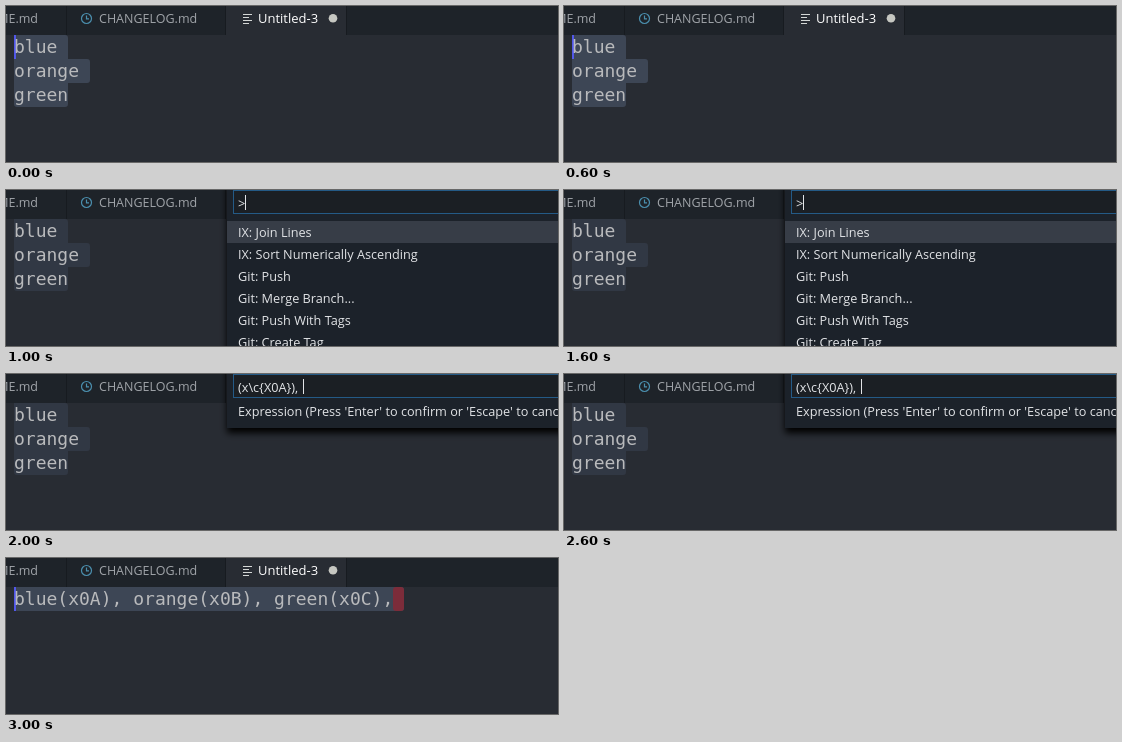
Recreate the animation shown at these times as an HTML page. Size 552x156 px, loop 4 s.

```html
<!DOCTYPE html>
<html lang="en">
<head>
<meta charset="utf-8">
<style>
  html, body { margin: 0; width: 100%; height: 100%; overflow: hidden; background: #282c33; }
  svg { display: block; }
  text { white-space: pre; }
  .ui { font: 12.7px "Open Sans", "Noto Sans", sans-serif; fill: #e2e4e7; }
  .tab { font-size: 12.5px; fill: #a0a4a9; }
  .code { font: 18px "DejaVu Sans Mono", monospace; fill: #b9babc; }
  .sel { fill: #3d4655; }
  .idle .sel { fill: #313844; }
  .caret { fill: #5258ea; }
  .idle .caret { display: none; }
</style>
</head>
<body>
<svg width="552" height="156" viewBox="0 0 552 156">
  <defs>
    <filter id="shadow" x="-10%" y="-20%" width="120%" height="160%">
      <feDropShadow dx="0" dy="5" stdDeviation="3.5" flood-color="#000"/>
    </filter>
  </defs>
  <rect width="552" height="156" fill="#282c33"/>

  <!-- Tab bar -->
  <rect width="552" height="29" fill="#1e2329"/>
  <path d="M60.5 0V29M219.5 0V29M340.5 0V29" stroke="#171b20"/>
  <rect x="220" width="120" height="29" fill="#282c33"/>
  <g class="ui">
    <text class="tab" x="32" y="17" text-anchor="end">README.md</text>
    <text class="tab" x="93" y="17">CHANGELOG.md</text>
    <text x="252" y="17" style="font-size:13px;fill:#fff">Untitled-3</text>
  </g>
  <g fill="none" stroke="#4b8fae" stroke-width="1.2">
    <circle cx="80.5" cy="12.5" r="5"/>
    <path d="M80.5 9.5V12.8H83"/>
  </g>
  <path d="M237 8.5h9M237 11.5h6M237 14.5h9M237 17.5h6" stroke="#d4d7d6"/>
  <circle cx="327" cy="12.2" r="4.3" fill="#c6c7c1"/>

  <!-- Editor -->
  <g id="list">
    <path class="sel" d="M8 29H59q3 0 3 3V53H81q3 0 3 3V74q0 3 -3 3H62V98q0 3 -3 3H11q-3 0 -3 -3Z"/>
    <rect class="caret" x="8" y="29" width="2" height="24"/>
    <g class="code">
      <text x="8" y="47">blue</text>
      <text x="8" y="71">orange</text>
      <text x="8" y="95">green</text>
    </g>
  </g>
  <g id="joined">
    <rect class="sel" x="8" y="29" width="390" height="24" rx="3"/>
    <rect x="387" y="29" width="11" height="24" rx="3" fill="#7c2c3a"/>
    <rect class="caret" x="8" y="29" width="2" height="24"/>
    <text class="code" x="8" y="47">blue(x0A), orange(x0B), green(x0C),</text>
  </g>

  <!-- Command palette -->
  <g id="palette" class="ui">
    <rect id="panel" x="221" y="-10" width="345" fill="#1f2329" filter="url(#shadow)"/>
    <rect x="227.5" y=".5" width="340" height="23" fill="#1b1f24" stroke="#245a86"/>
    <text id="input" x="232" y="17.5"></text>
    <rect id="cursor" y="5" width="1" height="15" fill="#e2e4e7"/>
    <g id="commands">
      <rect x="221" y="31" width="331" height="22" fill="#373d47"/>
    </g>
    <text id="hint" x="232" y="42">Expression (Press 'Enter' to confirm or 'Escape' to cancel)</text>
  </g>
</svg>
<script>
const el = id => document.getElementById(id);
const show = (id, on) => { el(id).style.display = on ? "" : "none"; };

const commands = ["IX: Join Lines", "IX: Sort Numerically Ascending", "Git: Push",
  "Git: Merge Branch...", "Git: Push With Tags", "Git: Create Tag"];
commands.forEach((name, i) => {
  const row = document.createElementNS("http://www.w3.org/2000/svg", "text");
  row.setAttribute("x", 232);
  row.setAttribute("y", 47 + 22 * i);
  row.textContent = name;
  el("commands").append(row);
});

// Steps: selected list, command menu, expression prompt, joined line
function draw(step) {
  const menu = step === 1, prompt = step === 2;
  show("list", step < 3);
  show("joined", step === 3);
  show("palette", menu || prompt);
  show("commands", menu);
  show("hint", prompt);
  el("list").classList.toggle("idle", menu || prompt);
  el("panel").setAttribute("height", menu ? 190 : 64);
  el("input").textContent = menu ? ">" : "(x\\c{X0A}), ";
  el("cursor").setAttribute("x", menu ? 239 : 297);
}

let shown = -1;
const start = performance.now();
function tick() {
  const step = Math.floor((performance.now() - start) % 4000 / 1000);
  if (step !== shown) draw(shown = step);
  requestAnimationFrame(tick);
}
tick();
</script>
</body>
</html>
```
